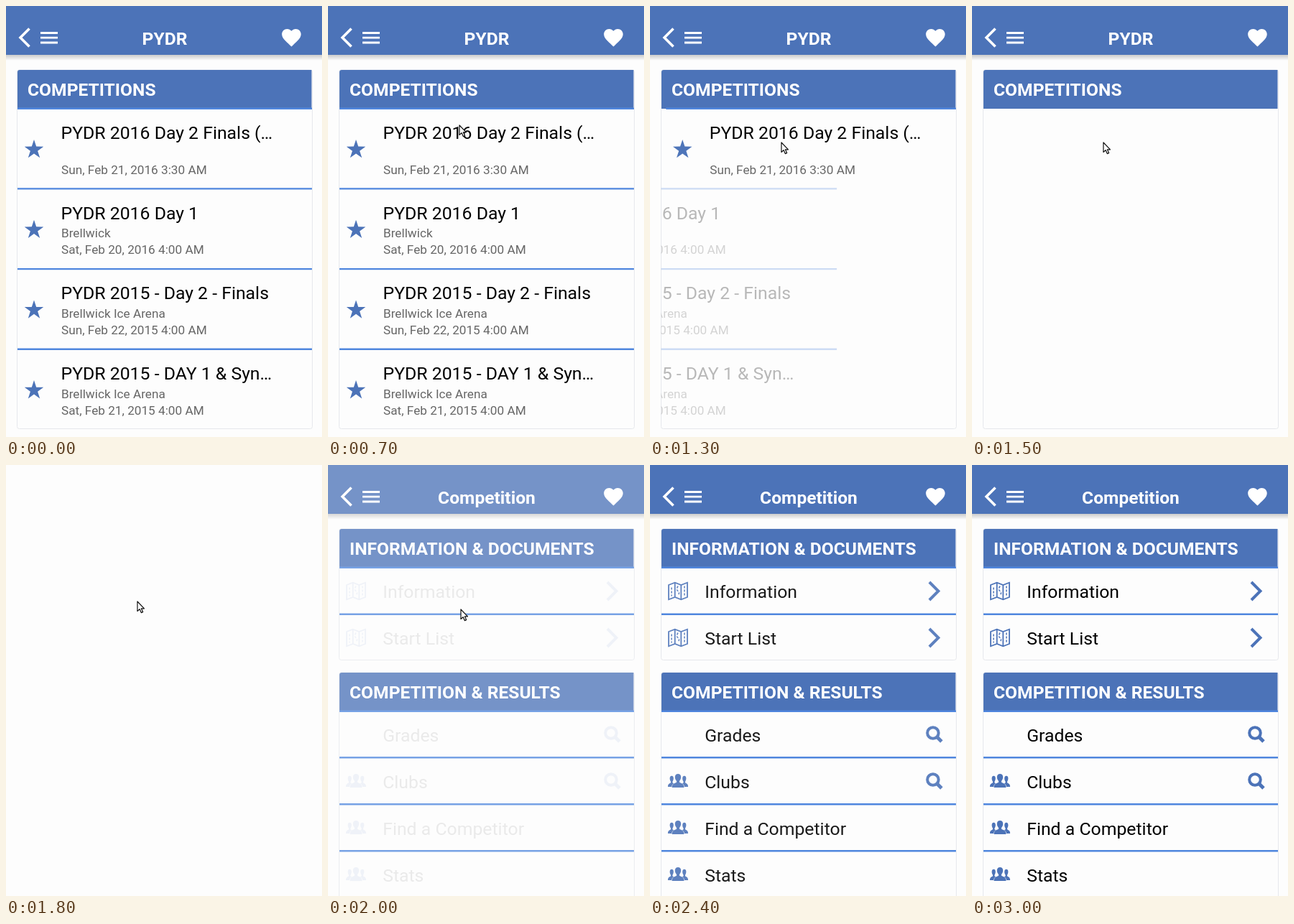
These frames come from a looping animation (440 px wide and 600 px high, 3200 ms). An HTML page:

```html
<!DOCTYPE html>
<html lang="en">
<head>
<meta charset="utf-8">
<style>
html, body { margin: 0; width: 100%; height: 100%; overflow: hidden; background: #fdfdfd; }
svg { display: block; font: 24.8px Roboto, sans-serif; }
.bold { font-weight: 700; font-size: 24.6px; fill: #fff; }
.small { font-size: 17.2px; fill: #666; }
.line { stroke: #4f86de; stroke-width: 2.4; }
.blue { fill: #4c73b8; }
.stroke { fill: none; stroke: #4c73b8; }
.white { fill: none; stroke: #fff; }
</style>
</head>
<body>
<svg id="stage" width="440" height="600" viewBox="0 0 440 600"></svg>
<script>
const LOOP = 3200, STEP = 100;
const stage = document.getElementById('stage');

const text = (x, y, s, cls = '') => `<text x="${x}" y="${y}" class="${cls}">${s}</text>`;
const line = (y, end = 426) => `<path class="line" d="M16 ${y}H${end}"/>`;
const at = (x, y, body) => `<g transform="translate(${x} ${y})">${body}</g>`;

const toolbar = title => `
  <rect y="68" width="440" height="8" fill="url(#shade)"/>
  <rect class="blue" width="440" height="68"/>
  <path class="white" stroke-width="3.6" d="M32.5 31.5L20 44L32.5 56.5"/>
  <path class="white" stroke-width="2.8" d="M48 37.5H72M48 44.2H72M48 51H72"/>
  <text x="221" y="54" class="bold" text-anchor="middle">${title}</text>
  <path fill="#fff" transform="translate(381.5 28) scale(1.33)" d="M12 21.35l-1.45-1.32C5.4 15.36 2 12.28 2 8.5
    2 5.42 4.42 3 7.5 3c1.74 0 3.41.81 4.5 2.09C13.09 3.81 14.76 3 16.5 3 19.58 3 22 5.42 22 8.5c0 3.78-3.4 6.86-8.55 11.54z"/>`;

const card = (y, bottom, title) => `
  <rect x="15.5" y="${y}" width="411" height="${bottom - y}" rx="3" fill="#fdfdfd" stroke="#e6e8ec"/>
  <path class="blue" d="M16 ${y + 54}V${y + 3}q0-3 3-3H425.5V${y + 54}z"/>
  ${text(30, y + 36, title, 'bold')}`;

const starPoints = Array.from({ length: 10 }, (_, i) => {
  const r = i % 2 ? 5.4 : 14, a = i * Math.PI / 5;
  return [39 + r * Math.sin(a), 200 - r * Math.cos(a)].map(v => v.toFixed(1));
}).join(' ');

const event = ([title, place, date], i) => `<g class="event">${at(0, i * 111.7, `
  ${line(142.7, 430)}
  <polygon class="blue" points="${starPoints}"/>
  ${text(76.5, 185, title)}
  ${text(77, 210.5, place, 'small')}
  ${text(77, 233.8, date, 'small')}`)}</g>`;

// Row icons, drawn around the middle of the row
const map = at(39, 0, `<path class="stroke" stroke-width="1.8" d="M-13-8.5l8.7-3.3 8.6 3.3 8.7-3.3V8.5l-8.7 3.3-8.6-3.3-8.7 3.3z
  M-4.3-11.8V8.5M4.3-8.5V11.8"/><path class="stroke" stroke-width="1.5" stroke-dasharray="3 2" d="M-9-5V7M0-7q-3 5 0 7t0 6M9-7V7"/>`);
const person = '<path class="blue" d="M0-9.5c5.2 0 5.2 6.5 2 10v1.8c2.5 1.6 6.5 1.6 6.5 7.2h-17c0-5.6 4-5.6 6.5-7.2V.5c-3.2-3.5-3.2-10 2-10z"/>';
const side = x => `<g transform="translate(${x} .8) scale(.62 .8)">${person}</g>`;
const people = at(39, -1, side(-8.8) + side(8.8) +
  `<g stroke="#fdfdfd" stroke-width="1.2" paint-order="stroke">${person}</g>`);
const chevron = '<path class="stroke" stroke-width="4" d="M389-12.5L401.5 0L389 12.5"/>';
const search = `<circle class="stroke" stroke-width="4" cx="394" cy="-2.5" r="7.8"/>
  <path class="stroke" stroke-width="5" d="M399.5 3L406 9.5"/>`;

const row = (y, label, icons) => at(0, y, icons) + text(76.2, y + 9.5, label);

const events = [
  ['PYDR 2016 Day 2 Finals (…', '', 'Sun, Feb 21, 2016 3:30 AM'],
  ['PYDR 2016 Day 1', 'Brellwick', 'Sat, Feb 20, 2016 4:00 AM'],
  ['PYDR 2015 - Day 2 - Finals', 'Brellwick Ice Arena', 'Sun, Feb 22, 2015 4:00 AM'],
  ['PYDR 2015 - DAY 1 &amp; Syn…', 'Brellwick Ice Arena', 'Sat, Feb 21, 2015 4:00 AM']
];

stage.innerHTML = `
  <defs>
    <linearGradient id="shade" x2="0" y2="1">
      <stop stop-color="#000" stop-opacity=".2"/><stop offset="1" stop-color="#000" stop-opacity="0"/>
    </linearGradient>
    <clipPath id="list"><path d="M15.5 89H426V588H15.5z"/></clipPath>
  </defs>
  <g id="first">
    ${toolbar('PYDR')}
    ${card(89, 588.5, 'COMPETITIONS')}
    <g clip-path="url(#list)">${events.map(event).join('')}</g>
  </g>
  <g id="second">
    ${toolbar('Competition')}
    ${card(89, 271.5, 'INFORMATION &amp; DOCUMENTS')}
    ${card(289, 620, 'COMPETITION &amp; RESULTS')}
    ${[142.7, 207.7, 342.7, 407.3, 472.2, 537.2].map(y => line(y)).join('')}
    <g id="rows">
      ${row(175.5, 'Information', map + chevron)}
      ${row(240.5, 'Start List', map + chevron)}
      ${row(375.5, 'Grades', search)}
      ${row(440.5, 'Clubs', people + search)}
      ${row(505.5, 'Find a Competitor', people)}
      ${row(570.5, 'Stats', people)}
    </g>
  </g>
  <path id="cursor" fill="#fff" stroke="#111" stroke-width="1.2" stroke-linejoin="round"
    d="M0 0V13.5L3.1 10.6L5.3 15.6L7.6 14.6L5.4 9.8H9.5z"/>`;

const [first, second, rows, cursor] = ['first', 'second', 'rows', 'cursor'].map(id => document.getElementById(id));
const items = [...document.querySelectorAll('.event')];

const progress = (t, start, end) => Math.min(1, Math.max(0, (t - start) / (end - start)));
const move = (el, x, y = 0) => el.setAttribute('transform', `translate(${x} ${y})`);
const show = (el, on) => el.style.display = on ? '' : 'none';

function draw(t) {
  show(first, t < 1800);
  show(second, t >= 1800);

  const leave = progress(t, 950, 1430), chosen = progress(t, 1272, 1500) ** 2;
  items.forEach((el, i) => {
    move(el, i ? -233 * leave : 414 * chosen);
    el.style.opacity = 1 - (i ? leave : chosen);
  });

  second.style.opacity = progress(t, 1800, 2060);
  rows.style.opacity = progress(t, 1950, 2450);

  const drift = Math.max(0, t - 1800) / 200;
  const y = t < 700 ? 154 : t < 800 ? 166 : 190;
  move(cursor, 183 + 2 * drift, y + 11 * drift);
  show(cursor, t >= 600 && t < 2200);
}

function tick() {
  draw(Math.floor(performance.now() % LOOP / STEP) * STEP);
  requestAnimationFrame(tick);
}
tick();
</script>
</body>
</html>
```
